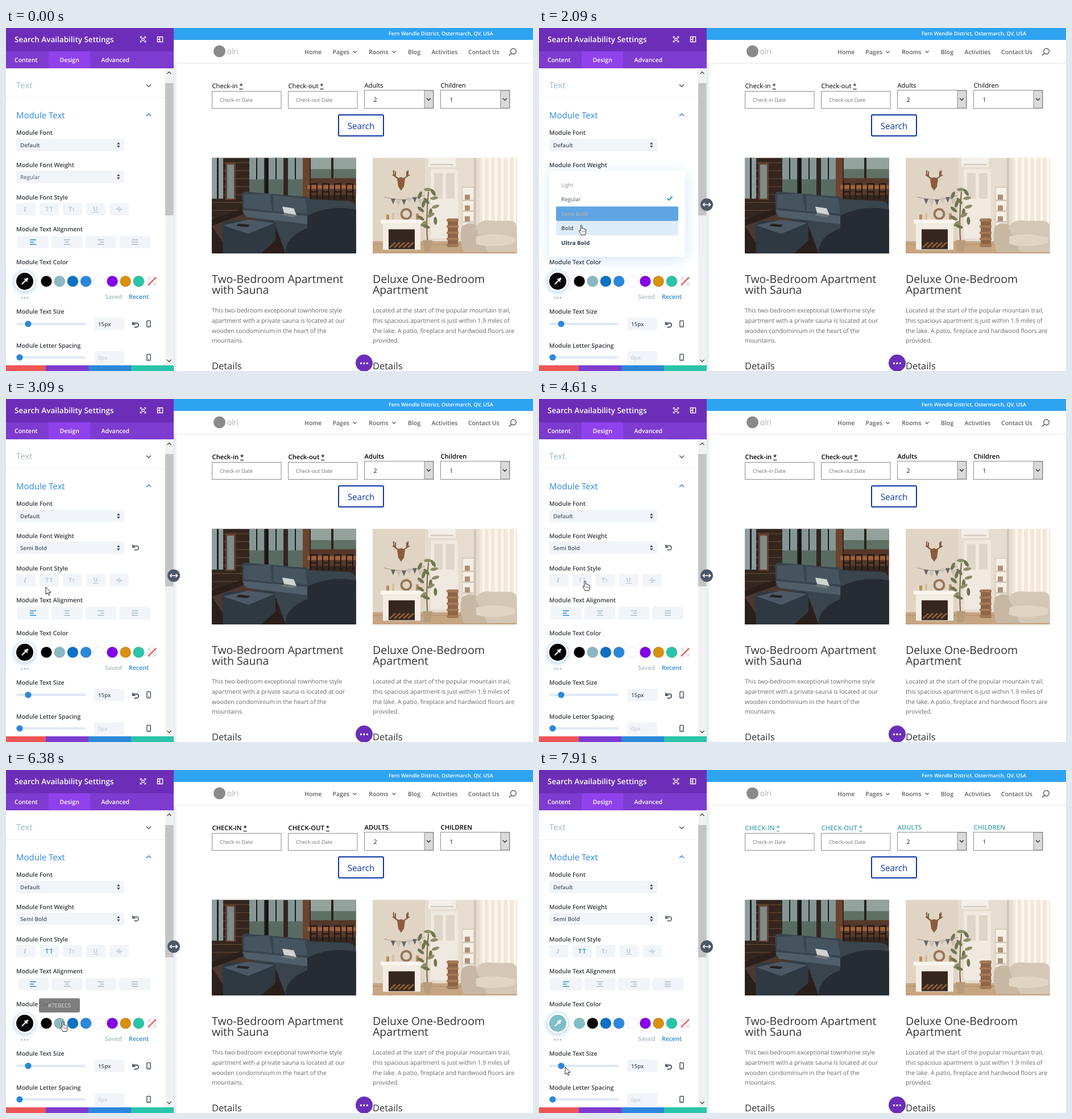
Animation, 927 px wide and 604 px high, one loop 8000 ms. Source, as an HTML page:

```html
<!DOCTYPE html>
<html lang="en">
<head>
<meta charset="utf-8">
<title>Search availability settings</title>
<style>
html, body { margin: 0; width: 100%; height: 100%; overflow: hidden; background: #fff; }
svg { display: block; font-family: "Open Sans", sans-serif; text-rendering: geometricPrecision; }
text { white-space: pre; }
.glow { filter: drop-shadow(0 1px 4px rgba(43, 135, 218, .5)); }
.lift { filter: drop-shadow(0 4px 12px rgba(43, 135, 218, .22)); }
</style>
</head>
<body>
<svg width="927" height="604" viewBox="0 0 927 604"><g id="still"></g><g id="live"></g></svg>
<script>
const LOOP = 8000, BLUE = '#2b87da', INK = '#32373c', SLATE = '#4c5866', FIELD = '#f1f5f9', FAINT = '#b4c4d4';

const text = (x, y, s, size, fill, weight = 400, extra = '') =>
  `<text x="${x}" y="${y}" font-size="${size}" fill="${fill}" font-weight="${weight}" ${extra}>${s}</text>`;
const rect = (x, y, w, h, fill, rx = 0, extra = '') =>
  `<rect x="${x}" y="${y}" width="${w}" height="${h}" fill="${fill}" rx="${rx}" ${extra}/>`;
const disc = (x, y, r, fill, extra = '') => `<circle cx="${x}" cy="${y}" r="${r}" fill="${fill}" ${extra}/>`;
const shape = (d, fill) => `<path d="${d}" fill="${fill}"/>`;
const line = (d, color, w = 1.5, extra = '') =>
  `<path d="${d}" fill="none" stroke="${color}" stroke-width="${w}" ${extra}/>`;
const group = (x, y, inner) => `<g transform="translate(${x} ${y})">${inner}</g>`;
const repeat = (n, f) => Array.from({ length: n }, (_, i) => f(i)).join('');
const label = (y, s) => text(18, y, s, 10.5, INK, 600);
const chevron = (x, y, color, r = 4, dir = 1) => line(`M${x - r} ${y - dir * r / 2}l${r} ${dir * r} ${r} ${-dir * r}`, color, 1.5);
const undo = (x, y, color) => group(x, y, line('M-4 -2.5H1.5a3.6 3.6 0 0 1 0 7.2H-2.5', color, 2) + shape('M-6 -5.5V1H.5z', color));
const phone = y => rect(247.8, y - 5.5, 6.4, 11, 'none', 1.2, `stroke="${SLATE}" stroke-width="1.5"`) + rect(250, y + 3, 2, 1, SLATE);

function picker(y) {
  return rect(18, y, 190, 22, FIELD, 2) + shape(`M195 ${y + 10}l2.8-4 2.8 4zM195 ${y + 12}l2.8 4 2.8-4z`, SLATE);
}

function slider(y, knob, value, color) {
  return rect(18, y - 2, 122, 4, '#dde9f6', 2) + disc(knob, y, 5.6, BLUE) +
    rect(155, y - 11, 53, 22, FIELD, 2) + text(162, y + 4, value, 9.75, color, 600) + phone(y);
}

function panel() {
  const bars = [['#ef5555', 0], ['#7d3bcf', 70], [BLUE, 145], ['#29c4a9', 220]];
  return rect(295, 62, 7, 542, 'url(#edge)') + rect(0, 0, 295, 604, '#fff') +
    rect(225, 68, 51, 5, FIELD, 2) +
    rect(0, 0, 295, 41, '#6c2eb9') + rect(0, 41, 295, 30, '#7e3bd0') + rect(75, 41, 73, 30, '#8f42ec') +
    text(15, 25, 'Search Availability Settings', 13.5, '#fff', 600) +
    line('M236.5 18v-2.5H239M243 15.500h2.500V18M245.500 22v2.500H243M239 24.500h-2.500V22', '#fff', 1.4) +
    rect(239, 18, 4, 4, 'none', 0, 'stroke="#fff" stroke-width="1.3"') +
    rect(266.500, 15.500, 9, 9, 'none', 0, 'stroke="#fff" stroke-width="1.4"') +
    line('M270.500 15v10M266 20h4', '#fff', 1.4) +
    [['Content', 15], ['Design', 94.500], ['Advanced', 167.500]].map(([s, x]) => text(x, 60, s, 10.5, '#fff', 600)).join('') +
    text(18, 106, 'Text', 15, '#9fb8c3') + chevron(251, 101.500, SLATE) + rect(0, 122, 280, 1, '#edf1f5') +
    text(18, 159, 'Module Text', 15, BLUE) + chevron(251, 153, BLUE, 4, -1) +
    label(188, 'Module Font') + picker(195) + text(25, 209.500, 'Default', 9.75, SLATE, 600) +
    label(245, 'Module Font Weight') + picker(251) +
    label(302, 'Module Font Style') + repeat(5, i => rect(18 + 41 * i, 308, 34, 22, FIELD, 2)) +
    text(31, 323, 'I', 11, FAINT, 600, 'font-family="Noto Serif, serif" font-style="italic"') +
    text(110, 323, 'T<tspan font-size="8">T</tspan>', 11, FAINT, 600) +
    text(153.500, 322, 'U', 10.5, FAINT, 600) + rect(153, 324, 10, 1, FAINT) +
    text(196, 323, 'S', 11, FAINT, 600) + rect(193, 318.500, 12, 1.2, FAINT) +
    label(358, 'Module Text Alignment') + repeat(4, i => {
      const x = 20 + 59.700 * i, a = x + 22, indent = [0, 2, 4, 0][i], short = i == 3 ? 11 : 7;
      return rect(x, 366, 55, 22, FIELD, 2) +
        line(`M${a} 373h11M${a + indent} 377h${short}M${a} 381h11`, i ? '#a9b9c8' : BLUE, 1.3);
    }) +
    label(416, 'Module Text Color') + repeat(3, i => disc(28 + 5 * i, 475, 1.5, '#a3b5c4')) +
    text(174, 477, 'Saved', 10.5, '#a6bac4', 600) + text(216, 477, 'Recent', 10.5, BLUE, 600) +
    label(503, 'Module Text Size') + slider(521, 39, '15px', SLATE) + undo(228, 522, SLATE) +
    label(563, 'Module Letter Spacing') + slider(580, 24, '0px', '#c3ced8') +
    rect(280, 71, 15, 523, '#f1f1f1') + rect(280, 97, 14.500, 233, '#c4c4c4') +
    chevron(287, 79, '#505050', 3.5, -1) + chevron(287, 586, '#505050', 3.5) +
    bars.map(([c, x]) => rect(x, 594, 75, 10, c)).join('');
}

function loungePhoto() {
  return rect(0, 0, 254, 169, '#33261f') +
    repeat(9, i => rect(0, 8 + 14 * i, 70, 1.500, '#59402f')) +
    rect(0, 0, 20, 72, '#8d9d9f') + rect(9, 0, 3, 72, '#241d1a') + rect(24, 8, 18, 66, '#65402c') + rect(27, 12, 12, 60, '#7d8b8a') +
    repeat(3, i => rect(66 + 34 * i, 0, 26, 68, '#849795') + rect(78 + 34 * i, 0, 2, 68, '#1c1a19') + rect(66 + 34 * i, 38, 26, 30, '#586b63')) +
    rect(94, 0, 5, 70, '#141516') + rect(160, 0, 12, 72, '#6c442d') +
    rect(174, 0, 80, 36, '#93a29c') + rect(174, 20, 80, 16, '#5e7164') +
    rect(210, 0, 4, 40, '#2c211b') + rect(174, 36, 80, 30, '#55382a') +
    shape('M168 48h86v7h-86z', '#9b613a') +
    repeat(4, i => line(`M${174 + 21 * i} 73V46h11V73M${174 + 21 * i} 60h11`, '#1f1613', 2)) +
    shape('M0 108L60 88 254 122V169H0z', '#2a1f1b') +
    shape('M0 120L55 100 90 110 20 150z', '#4b3830') +
    shape('M53 66Q54 58 64 60L158 68Q168 66 172 73L240 76Q254 78 254 92V169H130L112 120 55 100z', '#39444d') +
    shape('M57 65L102 63 106 94 56 88zM108 66L164 72 168 98 109 94z', '#465460') +
    shape('M54 92L172 103 250 100V114L178 118 60 104z', '#505e69') +
    shape('M168 102Q208 82 254 91V169H130Q128 140 168 124z', '#252c33') +
    shape('M18 120Q18 112 30 111L98 110Q112 110 112 118V146L86 169H20z', '#2f3942') +
    shape('M20 119L64 109 110 115 64 134z', '#4c5965') +
    shape('M47 116l20 2-4 4-20-2z', '#222') +
    shape('M124 86l20 3 5 12-22-4z', '#cfd3d3') + shape('M128 97l22 4-7 4-20-4z', '#6d7578');
}

function loftPhoto() {
  const flags = repeat(6, i => shape(`M${32 + 9.500 * i} ${72 + 3 * Math.sin(i * 1.3)}h8l-4 10z`, i % 2 ? '#c8bfb2' : '#646667'));
  const plant = repeat(14, i => {
    const x = 97 + 14 * Math.sin(i * 2.4), y = 56 + i * 5;
    return `<ellipse cx="${x}" cy="${y}" rx="7" ry="3" fill="${i % 3 ? '#6f7650' : '#8d8e66'}" transform="rotate(${i * 57} ${x} ${y})"/>`;
  });
  return rect(0, 0, 254, 169, '#e6dccf') + rect(0, 0, 92, 150, '#e0d4c5') +
    rect(98, 0, 48, 16, '#f3eee7') + rect(102, 11, 40, 2, '#cfc4b7') +
    rect(102, 20, 48, 122, '#f0e9e0') + rect(108, 27, 15, 45, '#dfd5c9') + rect(129, 27, 15, 45, '#dfd5c9') +
    rect(188, 0, 66, 142, '#f2e7d9') + repeat(6, i => rect(193 + 11 * i, 0, 4, 138, '#fff8ed')) +
    rect(178, 0, 4, 140, '#d2c6b8') +
    line('M50 37Q35 36 37 22M43 35L35 30M50 37Q64 36 62 22M57 35L65 30M40 33V24M60 33V24', '#80583b', 2) +
    shape('M43 37l7-3 7 3-2 14-5 7-5-7z', '#8a5d3c') +
    line('M20 69Q56 80 92 66', '#8d8376', .8) + flags +
    disc(59, 99, 8.500, 'none', 'stroke="#987759" stroke-width="4"') +
    rect(24, 100, 5, 10, '#b78c55') + rect(34, 97, 4, 13, '#d4bfa0') + rect(76, 98, 5, 12, '#bc8f68') +
    rect(0, 147, 254, 22, '#c6a583') + rect(0, 152, 254, 1, '#ae8b69') +
    rect(14, 109, 73, 7, '#faf6ef') + rect(18, 116, 66, 46, '#f2ece2') + rect(28, 126, 46, 35, '#35271f') +
    repeat(5, i => line(`M${30 + 8 * i} 158l10 -9`, '#8e5e3c', 3)) +
    line('M97 159Q93 110 98 60', '#776143', 2) + plant + shape('M88 145h17l-3 20H91z', '#b69c7b') +
    rect(132, 107, 18, 50, '#8e6546') + repeat(5, i => rect(130, 108 + 11 * i, 21, 4, '#a57b58')) +
    rect(158, 52, 20, 75, '#f5efe6', 0, 'stroke="#cabdab"') +
    repeat(3, i => rect(159, 74 + 19 * i, 18, 2, '#cabdab') + rect(162, 65 + 19 * i, 9, 9, '#ad8f75')) +
    shape('M157 121Q174 108 189 125L208 134 202 166H160Q151 142 157 121z', '#c8b8a3') +
    shape('M181 123Q189 107 210 111H240Q254 111 254 126V166H202z', '#d5c7b5') +
    shape('M182 139Q208 130 250 140V150Q214 160 182 152z', '#e0d4c3');
}

function selectBox(x, value) {
  return rect(x + .5, 109.500, 121.500, 32, '#fff', 0, 'stroke="#8c8c8c"') +
    rect(x + 106, 110, 15.500, 31, '#dadada', 0, 'stroke="#8c8c8c"') + chevron(x + 113.500, 125.500, '#333', 3.5) +
    text(x + 16.500, 129.500, value, 10.5, '#111');
}

function page() {
  const menu = [['Home', 525], ['Pages', 574.500], ['Rooms', 638], ['Blog', 707], ['Activities', 748.500], ['Contact Us', 813]];
  const rooms = [
    [362, loungePhoto(), ['Two-Bedroom Apartment', 'with Sauna'],
      ['This two-bedroom exceptional townhome style', 'apartment with a private sauna is located at our',
        'wooden condominium in the heart of the', 'mountains.']],
    [645, loftPhoto(), ['Deluxe One-Bedroom', 'Apartment'],
      ['Located at the start of the popular mountain trail,', 'this spacious apartment is just within 1.9 miles of',
        'the lake. A patio, fireplace and hardwood floors are', 'provided.']]
  ];
  return rect(295, 0, 632, 21, '#2ea3f2') + text(673, 13, 'Fern Wendle District, Ostermarch, QV, USA', 9, '#fff', 600) +
    rect(295, 61.500, 632, 1, '#e6e6e6') + rect(295, 62.500, 632, 1, '#f6f6f6') +
    disc(375.500, 41, 10.500, '#8a8a8a') + text(389, 46, 'olri', 14, '#858585', 300) +
    menu.map(([s, x]) => text(x, 46, s, 10.5, '#606060', 600)).join('') +
    chevron(613.500, 42, '#666', 3) + chevron(682.500, 42, '#666', 3) +
    disc(892.500, 41, 4.800, 'none', 'stroke="#555" stroke-width="1.4"') + line('M889 44.500L885 48.500', '#555', 1.6) +
    ['Check-in Date', 'Check-out Date'].map((s, i) => rect(362.500 + 134 * i, 111.500, 121.500, 30, '#fff', 0, 'stroke="#8c8c8c"') +
      text(376 + 134 * i, 129.500, s, 9, '#717171')).join('') +
    selectBox(630, '2') + selectBox(764, '1') +
    rect(585, 153, 79, 37, '#fff', 2, 'stroke="#0c36a8" stroke-width="2"') +
    text(624.500, 178, 'Search', 15.2, '#0c36a8', 500, 'text-anchor="middle"') +
    rooms.map(([x, photo, title, body]) =>
      `<svg x="${x}" y="228.500" width="253.500" height="168.500" viewBox="0 0 253.500 168.500">${photo}</svg>` +
      title.map((s, i) => text(x, 448.500 + 19.500 * i, s, 19.5, '#333')).join('') +
      body.map((s, i) => text(x, 501 + 17.800 * i, s, 10.5, '#666')).join('') +
      text(x, 601, 'Details', 16.5, '#333')).join('') +
    disc(630, 590, 15, '#6c2eb9') + repeat(3, i => disc(624.500 + 5.500 * i, 590.500, 1.700, '#fff'));
}

// keys: rows of [time, ...values], joined by straight lines
function at(keys, t) {
  const i = keys.findIndex(k => k[0] > t);
  if (i < 0) return keys.at(-1).slice(1);
  if (!i) return keys[0].slice(1);
  const a = keys[i - 1], b = keys[i], p = (t - a[0]) / (b[0] - a[0]);
  return a.slice(1).map((v, j) => v + (b[j + 1] - v) * p);
}
const within = (t, ...spans) => spans.some(([a, b]) => t >= a && t < b);

const path = [
  [110, 514, 441], [480, 290, 300], [600, 210, 238], [720, 163, 233], [840, 173, 263],
  [1730, 173, 263], [1830, 148, 283], [1960, 98, 326], [2090, 75, 346], [2220, 62, 366], [2345, 50, 386],
  [2470, 60, 374], [2590, 70, 353], [2720, 72, 335], [2970, 70, 331],
  [3220, 70, 331], [3345, 92, 327], [3595, 172, 319], [3720, 138, 319], [3845, 128, 319], [4220, 81, 320],
  [5095, 81, 320], [5220, 92, 341], [5345, 95, 349], [5845, 112, 439], [5970, 112, 448], [6095, 112, 448],
  [6220, 103, 445], [6345, 100, 443], [6720, 100, 443], [6845, 96, 443], [7095, 96, 443], [7220, 88, 442],
  [7345, 85, 450], [7845, 46, 523]
];
const pop = [[970, .85, .1], [1100, .9, .5], [1220, .98, .9], [1345, 1.04, 1], [1470, 1.027, 1], [1720, 1, 1]];
const weights = [
  ['Light', 300, [[1720, 0], [1830, .5], [1970, 0]]],
  ['Regular', 400, [[1720, 0], [1830, .3], [1970, .4], [2090, 0]]],
  ['Semi Bold', 600, [[1845, 0], [1970, .9], [2095, .75], [2220, 0], [2595, 0], [2720, .8], [2845, 1]]],
  ['Bold', 700, [[1970, 0], [2095, .16], [2220, 1], [2345, .3], [2470, .6], [2595, 1], [2720, .3], [2845, 0]]],
  ['Ultra Bold', 800, [[2220, 0], [2345, 1], [2470, .4], [2595, 0]]]
];

function dropdown(t) {
  const [scale, alpha] = at(pop, t);
  const rows = weights.map(([name, weight, keys], i) => {
    const [on] = at(keys, t), y = 263.300 + 25.500 * i;
    return rect(30, y, 215, 25.500, BLUE, 2, `opacity="${on}"`) +
      text(39, y + 16.500, name, 9.75, `color-mix(in srgb, #fff ${on * 70}%, ${SLATE})`, weight);
  }).join('');
  return `<g opacity="${alpha}" transform="translate(137.500 327) scale(${scale}) translate(-137.500 -327)">` +
    rect(18, 251, 239, 152, '#fff', 2, 'class="lift"') + rows + line('M225.500 300l3 3 6-6.500', '#3a9bcb', 2.2) + '</g>';
}

function fieldLabels(t) {
  const color = t < 6660 ? '#000' : '#45a5aa', weight = t < 3090 ? 400 : 600;
  return ['Check-in', 'Check-out', 'Adults', 'Children'].map((s, i) => {
    const star = i < 2 ? ' <tspan text-decoration="underline dotted">*</tspan>' : '';
    return text(362.500 + 134 * i, i < 2 ? 106 : 104.500, (t < 4850 ? s : s.toUpperCase()) + star, 11.25, color, weight);
  }).join('');
}

function swatches(t) {
  const colors = ['#000', '#8bb8c1', '#0c71c3', BLUE, '#fff', '#8300e9', '#d9900f', '#29c4a9'], picked = t >= 6540;
  if (picked) colors.splice(0, 2, '#7ebec5', '#000');
  return disc(33, 446, 18, '#fff', 'class="glow"') + disc(33, 446, 15, colors[0]) +
    line('M28.500 450.500L34 445', '#fff', 2.4, 'stroke-linecap="round"') + line('M32.500 441.500l5 5', '#fff', 1.8) +
    line('M35.500 443.500l2-2', '#fff', 3.6, 'stroke-linecap="round"') +
    colors.map((c, i) => disc(71 + 23.200 * i, 446, 9.600, c, `stroke="${c == '#fff' ? '#e3e8ec' : '#0002'}"`)).join('') +
    disc(257, 446, 9.600, '#f4f4f4') +
    repeat(9, i => rect(249.500 + i % 3 * 5, 438.500 + (i / 3 | 0) * 5, 5, 5, i % 2 ? '#fafafa' : '#e4e4e4')) +
    line('M250 453L264 439', '#ef5555', 2.2);
}

function tooltip(t) {
  if (!within(t, [6020, 7420])) return '';
  const [x, name] = t < 6270 ? [117.500, '#0C71C3'] : [94, '#7EBEC5'];
  return rect(x - 36, 402, 72, 25, '#717171', 3, 'opacity=".9"') + text(x, 418, name, 9.75, '#e2e2e2', 400, 'text-anchor="middle"');
}

function cursor(t, step) {
  if (t < 110) return '';
  const [x, y] = at(path, step), hand = within(t, [1960, 2980], [3340, 5390], [6020, 7420]);
  const d = hand
    ? 'M-1.300 10.500V1.200Q0 -.6 1.300 1.200V6.200Q3.400 5 4 6.800Q6 6 6.400 7.600Q8.200 7 8 9.500V13Q7.600 15 6.800 17.500H-.2Q-.8 15.500 -2.400 13.500Q-4.600 10.800 -3.800 10Q-3 9 -1.300 10.500z'
    : 'M0 0V13L3 10.300 5 14.600 7 13.700 5.100 9.500H9z';
  return group(x, y, `<path d="${d}" fill="#fff" stroke="#111" stroke-width=".9"/>` +
    (hand ? line('M1.500 10v3M3.500 10v3M5.500 10v3', '#444', .6) : ''));
}

function live(t) {
  const step = Math.floor((t + 42) / 125) * 125 - 30, bold = t >= 2980;
  const caps = t >= 4730 ? BLUE : t >= 4470 ? '#c6d2de' : FAINT;
  return fieldLabels(t) +
    text(25, 266, bold ? 'Semi Bold' : 'Regular', 9.75, SLATE, bold ? 600 : 500) + (bold ? undo(228, 261, '#66736f') : '') +
    text(69, 323, 'TT', 11, caps, 600, 'letter-spacing="1"') + swatches(t) +
    (t >= 480 ? disc(295, 311, 11, SLATE) + line('M289 311h12M291.500 308l-3 3 3 3M298.500 308l3 3-3 3', '#fff', 1.6) : '') +
    (within(t, [970, 2980]) ? dropdown(step) : '') + tooltip(t) + cursor(t, step);
}

const still = document.getElementById('still'), moving = document.getElementById('live');
still.innerHTML = '<defs><linearGradient id="edge"><stop stop-color="#dfe8f1"/><stop offset="1" stop-color="#fff"/></linearGradient></defs>' + page() + panel();

const start = performance.now();
let shown = '';
function draw() {
  const next = live(Math.max(0, performance.now() - start) % LOOP);
  if (next !== shown) moving.innerHTML = shown = next;
  requestAnimationFrame(draw);
}
draw();
</script>
</body>
</html>
```
